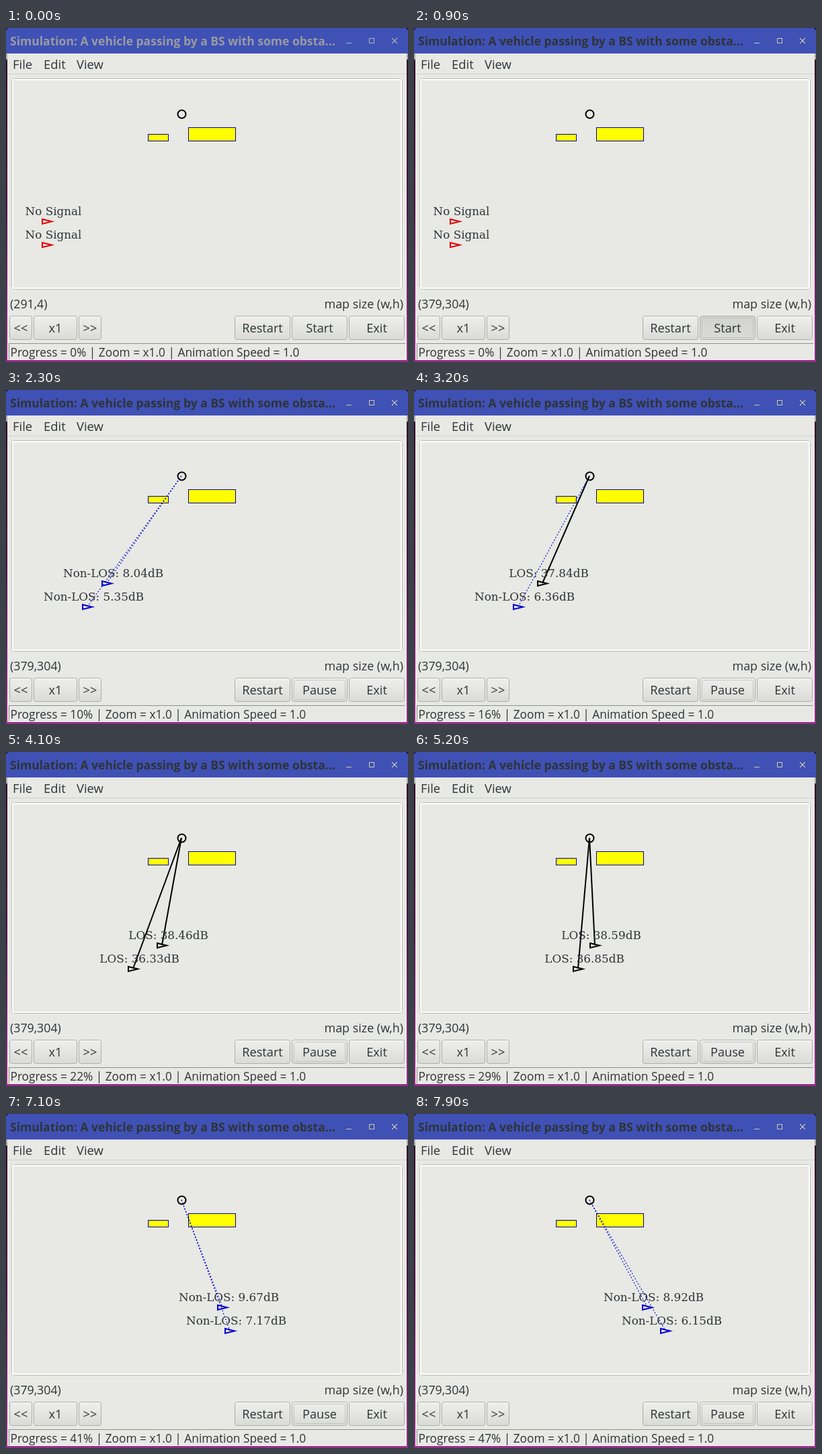
Write an HTML page with a canvas that moves like this. It is 598x498 px and loops after 8 s.

```html
<!DOCTYPE html>
<html lang="en">
<head>
<meta charset="utf-8">
<title>Simulation</title>
<style>
html, body { margin: 0; width: 100%; height: 100%; overflow: hidden; }
canvas { display: block; }
</style>
</head>
<body>
<canvas id="stage" width="598" height="498"></canvas>
<script>
const ctx = document.getElementById('stage').getContext('2d');
const LOOP = 8000, TICK = 100;
const FOCUS = 900, LAUNCH = 1000, RELEASE = 1200;
const BG = '#e8e8e4', INK = '#2e3436';
const UI = '"Open Sans", "Noto Sans", sans-serif';
const SERIF = '"DejaVu Serif", "Noto Serif", serif';

const station = { x: 261, y: 128 };
const obstacles = [{ x: 211, y: 158, w: 30, h: 10 }, { x: 271, y: 148, w: 70, h: 20 }];

// Key points shared by both vehicles: times, then the x reached at each
const keyTimes = [770, 2300, 4100, 5200, 6400, 7900];
const vehicles = [
  { y: 288, xs: [61, 150.2, 232.3, 269, 300.5, 347] },
  { y: 323, xs: [61, 121, 189.4, 244.9, 298.7, 374.3] }
];

const clamp01 = v => Math.min(1, Math.max(0, v));

function position(xs, t) {
  const next = Math.max(1, keyTimes.findIndex(k => t <= k));
  const part = (t - keyTimes[next - 1]) / (keyTimes[next] - keyTimes[next - 1]);
  return xs[next - 1] + (xs[next] - xs[next - 1]) * clamp01(part);
}

function blocks({ x, y, w, h }, target) {
  const beamX = at => station.x + (target.x - station.x) * (at - station.y) / (target.y - station.y);
  const top = beamX(y), bottom = beamX(y + h);
  return Math.max(top, bottom) >= x && Math.min(top, bottom) <= x + w;
}

function text(str, x, y, font, color = INK, align = 'left') {
  ctx.font = font;
  ctx.fillStyle = color;
  ctx.textAlign = align;
  ctx.fillText(str, x, y);
}

function line(x0, y0, x1, y1, color, width = 1, dash = []) {
  ctx.strokeStyle = color;
  ctx.lineWidth = width;
  ctx.setLineDash(dash);
  ctx.beginPath();
  ctx.moveTo(x0, y0);
  ctx.lineTo(x1, y1);
  ctx.stroke();
  ctx.setLineDash([]);
}

function rect(x, y, w, h, fill) {
  ctx.fillStyle = fill;
  ctx.fillRect(x, y, w, h);
}

function rounded(x, y, w, h, r, stroke, fill, width = 1) {
  ctx.beginPath();
  ctx.roundRect(x, y, w, h, r);
  if (fill) { ctx.fillStyle = fill; ctx.fill(); }
  ctx.strokeStyle = stroke;
  ctx.lineWidth = width;
  ctx.stroke();
}

function vertical(y0, y1, ...colors) {
  const g = ctx.createLinearGradient(0, y0, 0, y1);
  colors.forEach((c, i) => g.addColorStop(i / (colors.length - 1), c));
  return g;
}

const faces = {
  normal: ['#efefed', '#dadad6'],
  hover: ['#f4f4f2', '#e1e1dd'],
  pressed: ['#d2d2ce', '#dadad6']
};

function button(label, x, w, state = 'normal', focus = false) {
  rounded(x + 0.5, 429.5, w - 1, 35, 3, '#adada9', vertical(429, 465, ...faces[state]));
  if (state !== 'pressed') line(x + 3, 430.5, x + w - 3, 430.5, '#fafaf8');
  if (focus) rounded(x + 3.5, 432.5, w - 7, 29, 2, '#c3c3bf');
  text(label, x + w / 2, 454, '18.2px ' + UI, INK, 'center');
}

function titleIcons(color, width) {
  line(506, 22.5, 514, 22.5, color, width);
  ctx.strokeRect(540.5, 15.5, 7, 7);
  line(574, 15, 582, 23, color, width);
  line(582, 15, 574, 23, color, width);
}

function drawWindow(active) {
  rect(0, 0, 598, 498, vertical(0, 498, '#2c0a26', '#4c1244', '#963089'));
  rect(0, 38, 598, 9, '#a9a9a9');
  rect(2, 38, 594, 457, BG);
  ctx.fillStyle = '#3f51b5';
  ctx.beginPath();
  ctx.roundRect(0, 0, 598, 38, [5, 5, 0, 0]);
  ctx.fill();
  text('Simulation: A vehicle passing by a BS with some obsta…', 6, 26,
    'bold 17.53px ' + UI, active ? INK : '#999ba0');
  if (active) titleIcons('#36448f', 3);
  titleIcons(active ? '#c4c8d4' : '#a6abbe', 1.2);

  text('File', 10, 61, '18.4px ' + UI);
  text('Edit', 56, 61, '18.4px ' + UI);
  text('View', 105, 61, '18.4px ' + UI);
  line(2, 68.5, 596, 68.5, '#cfcfcb');
  rounded(8.5, 75.5, 581, 314, 4, '#b9b9b5');
  rounded(10, 77, 578, 311, 2, '#ffffff', BG, 2);
}

function drawVehicle({ y, xs }, t) {
  const exactX = position(xs, t), x = Math.floor(exactX);
  const range = Math.log10(Math.hypot(exactX - station.x, y - station.y));
  const rear = { x: exactX - 8, y };
  const los = !obstacles.some(o => blocks(o, rear));
  const snr = los ? 82.68 - 20 * range : 75.57 - 29.5 * range;
  const moving = t >= LAUNCH && snr >= 5;
  let color = '#e00000', label = 'No Signal';

  if (moving && los) {
    color = '#000000';
    label = `LOS: ${snr.toFixed(2)}dB`;
    line(station.x, station.y, x, y, color, 2);
  } else if (moving) {
    color = '#0000d0';
    label = `Non-LOS: ${snr.toFixed(2)}dB`;
    line(station.x, station.y, x, y, color, 1.1, [2, 2.5]);
  }
  ctx.strokeStyle = color;
  ctx.lineWidth = 2;
  ctx.beginPath();
  ctx.moveTo(x - 7, y - 3);
  ctx.lineTo(x + 7, y + 0.5);
  ctx.lineTo(x - 7, y + 4);
  ctx.closePath();
  ctx.stroke();
  text(label, x + 9.5, y - 9, '16.8px ' + SERIF, INK, 'center');
}

function drawMap(t) {
  for (const { x, y, w, h } of obstacles) {
    rect(x, y, w, h, '#ffff00');
    ctx.strokeStyle = '#0000a8';
    ctx.lineWidth = 1;
    ctx.strokeRect(x + 0.5, y + 0.5, w, h);
  }
  vehicles.forEach(v => drawVehicle(v, t));
  ctx.strokeStyle = '#000000';
  ctx.lineWidth = 2;
  ctx.beginPath();
  ctx.arc(station.x + 0.5, station.y + 0.5, 6, 0, Math.PI * 2);
  ctx.stroke();
}

function startState(t) {
  if (t >= FOCUS && t < RELEASE) return 'pressed';
  return t >= 300 && t < FOCUS ? 'hover' : 'normal';
}

function drawControls(t) {
  const glide = clamp01(t / 300);
  const pointerX = Math.round(291 + 88 * glide), pointerY = Math.round(4 + 300 * glide);
  text(`(${pointerX},${pointerY})`, 6, 418, '17.8px ' + UI);
  text('map size (w,h)', 591, 418, '17.9px ' + UI, INK, 'right');

  button('<<', 5, 34);
  button('x1', 41, 65);
  button('>>', 108, 34);
  button('Restart', 340, 83);
  button(t < LAUNCH ? 'Start' : 'Pause', 425, 83, startState(t), t >= FOCUS);
  button('Exit', 510, 83);

  line(4, 470.5, 594, 470.5, '#8f8f8b');
  line(4.5, 470, 4.5, 494, '#8f8f8b');
  line(5, 494.5, 595, 494.5, '#ffffff');
  line(594.5, 471, 594.5, 495, '#ffffff');
  const progress = t < LAUNCH ? 0 : Math.floor((t - keyTimes[0]) * 0.00662);
  text(`Progress = ${progress}% | Zoom = x1.0 | Animation Speed = 1.0`, 6.5, 490, '17.3px ' + UI);
}

function frame() {
  const now = performance.now() % LOOP;
  const t = Math.floor(now / TICK) * TICK;
  drawWindow(t >= FOCUS);
  drawMap(t < LAUNCH ? 0 : t);
  drawControls(t);
  requestAnimationFrame(frame);
}
frame();
</script>
</body>
</html>
```
